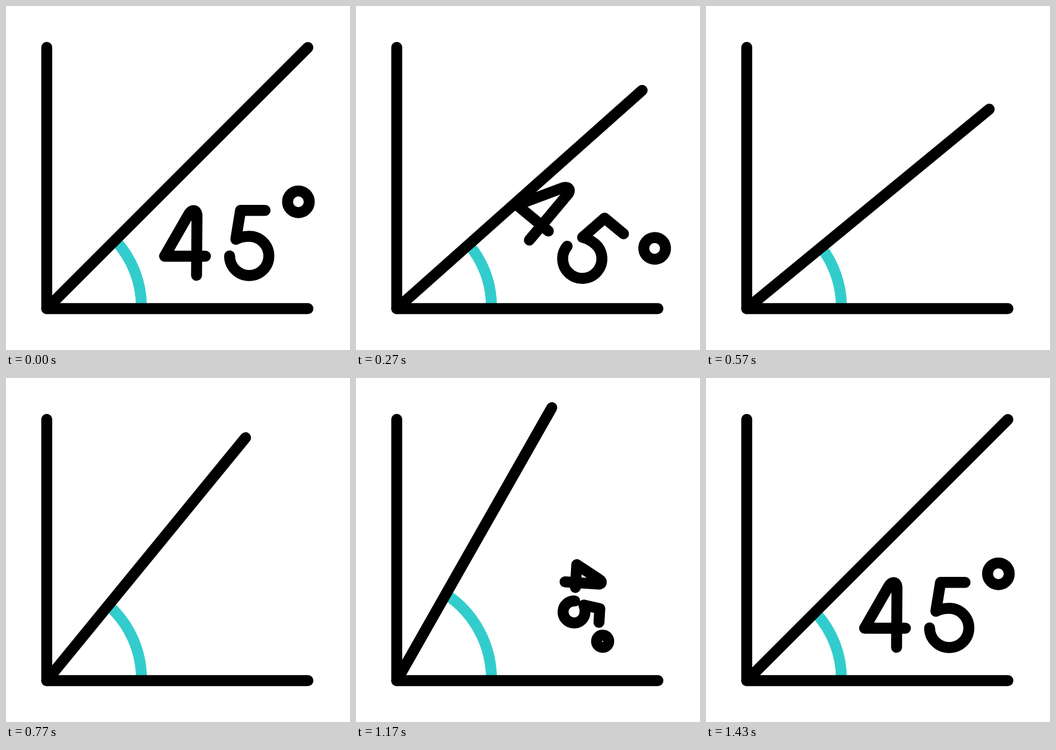
These frames come from a looping animation (640 px wide and 640 px high, 1670 ms). An HTML page with a canvas:

```html
<!DOCTYPE html>
<html lang="en">
<head>
<meta charset="utf-8">
<title>45 degree angle</title>
<style>
  html, body { margin: 0; width: 100%; height: 100%; overflow: hidden; background: #fff; }
  canvas { display: block; width: 640px; height: 640px; }
</style>
</head>
<body>
<canvas id="stage" width="640" height="640"></canvas>
<script>
const ctx = document.getElementById('stage').getContext('2d');
const LOOP = 1670, FPS = 30;
const RAD = Math.PI / 180;
const BLACK = '#000', TEAL = '#33cccc';
const CORNER = { x: 75.8, y: 563 };
const LABEL = { x: 429.5, y: 423.8 };

// Keys are [frame, value] pairs.
const armAngle = curve([[0, 45], [8, 41.65], [14, 37.6], [17, 39.44], [23, 50.7],
  [28, 60.4], [32, 64.1], [35, 60.4], [43, 45]]);
const armLength = curve([[0, 687], [8, 611], [12, 584], [35, 584], [43, 687]]);
const arcLead = curve([[0, 0], [8, -4.4], [14, 0]]);
const labelSpin = curve([[0, 0], [8, 39.6], [17, 180], [32, 180], [35, 93.5], [43, 0]]);
const labelScale = curve([[0, 1], [8, 1], [16, 0], [32, 0], [35, 0.56], [38, 1]]);

// Smooth monotone interpolation, flat at the ends and at every turning point.
function curve(keys) {
  const rate = i => (keys[i + 1][1] - keys[i][1]) / (keys[i + 1][0] - keys[i][0]);
  const slopes = keys.map((_, i) => {
    if (i === 0 || i === keys.length - 1) return 0;
    const a = rate(i - 1), b = rate(i);
    return a * b > 0 ? 2 * a * b / (a + b) : 0;
  });
  return frame => {
    const last = keys.length - 1;
    if (frame >= keys[last][0]) return keys[last][1];
    const i = keys.findIndex(key => key[0] > frame) - 1;
    const [f0, v0] = keys[i], [f1, v1] = keys[i + 1];
    const span = f1 - f0, u = (frame - f0) / span, w = 1 - u;
    return v0 * w * w * (1 + 2 * u) + v1 * u * u * (3 - 2 * u)
      + span * u * w * (slopes[i] * w - slopes[i + 1] * u);
  };
}

function stroke(path, color = BLACK) {
  ctx.strokeStyle = color;
  ctx.stroke(path);
}

function line(x, y) {
  const path = new Path2D();
  path.moveTo(CORNER.x, CORNER.y);
  path.lineTo(x, y);
  stroke(path);
}

const label = new Path2D(
  'M371 465.5 H295 L338.7 389.5 C345 377 355.5 378 355.3 391 L354.5 501' +
  'M482 380.3 H436.3 L427.6 434 C434 430.5 442 428.5 452.5 428.5' +
  'A36.5 36.5 0 1 1 416 465' +
  'M564.2 364.3 A20.2 20.2 0 1 1 523.8 364.3 A20.2 20.2 0 1 1 564.2 364.3 Z');

// The stroke keeps its weight while the outline shrinks.
function drawLabel(frame) {
  const scale = labelScale(frame);
  if (scale < 0.01) return;
  const matrix = new DOMMatrix()
    .translate(LABEL.x, LABEL.y)
    .rotate(labelSpin(frame))
    .scale(scale)
    .translate(-LABEL.x, -LABEL.y);
  const path = new Path2D();
  path.addPath(label, matrix);
  stroke(path);
}

function drawArc(angle) {
  const radius = 182 + 6.5 * ((angle - 40) / 20) ** 2;
  const cx = 252 - radius, cy = 560;
  const dx = Math.cos(angle * RAD), dy = -Math.sin(angle * RAD);
  const ox = CORNER.x - cx, oy = CORNER.y - cy;
  const b = ox * dx + oy * dy;
  const reach = -b + Math.sqrt(b * b - ox * ox - oy * oy + radius * radius);
  const path = new Path2D();
  path.arc(cx, cy, radius, 0, Math.atan2(oy + reach * dy, ox + reach * dx), true);
  stroke(path, TEAL);
}

function draw(frame) {
  ctx.fillStyle = '#fff';
  ctx.fillRect(0, 0, 640, 640);
  ctx.lineWidth = 20.4;
  ctx.lineCap = ctx.lineJoin = 'round';

  const angle = armAngle(frame), length = armLength(frame);
  drawArc(angle + arcLead(frame));
  line(CORNER.x, 77);
  line(561.7, CORNER.y);
  line(CORNER.x + length * Math.cos(angle * RAD), CORNER.y - length * Math.sin(angle * RAD));
  drawLabel(frame);
}

const start = performance.now();
function tick() {
  const time = (performance.now() - start) % LOOP;
  draw(Math.floor(time * FPS / 1000 + 0.15));
  requestAnimationFrame(tick);
}
tick();
</script>
</body>
</html>
```
